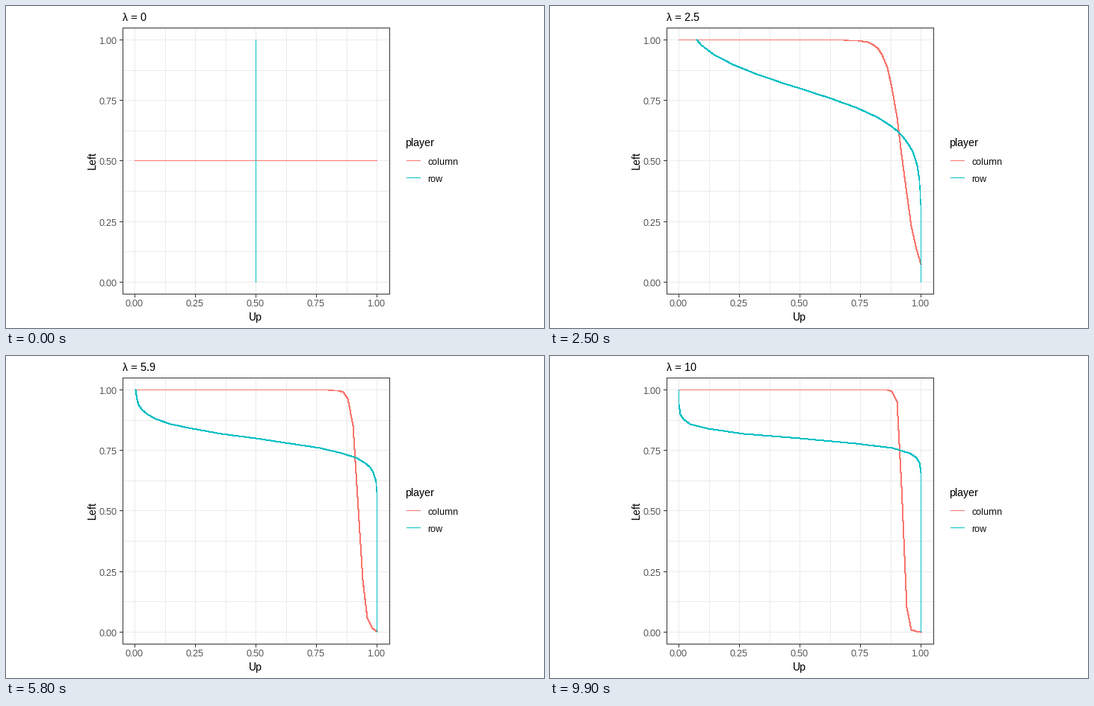
A matplotlib script that plays this animation: 720 by 432 pixels, repeating every 10 s.

```python
import numpy as np
import matplotlib.pyplot as plt
from matplotlib.animation import FuncAnimation

W, H, FRAMES = 720, 432, 100
LEFT, RIGHT, TOP, BOTTOM = 156, 513, 29, 386
X0, Y1, SPAN = 172.1, 45.38, 324.2
RED, TEAL = "#F8766D", "#00BFC4"

plt.rcParams.update({
    "font.family": "Liberation Sans",
    "text.hinting": "native",
    "text.hinting_factor": 1,
})

fig = plt.figure(figsize=(W / 72, H / 72), dpi=72, facecolor="white")
ax = fig.add_axes([0, 0, 1, 1])
ax.set_xlim(0, W)
ax.set_ylim(H, 0)
ax.axis("off")


def px(p):
    """Probability to the centre of its pixel column."""
    return np.floor(X0 + SPAN * np.asarray(p) + 0.5) + 0.5


def py(q):
    """Probability to the centre of its pixel row."""
    return np.floor(Y1 + SPAN * (1 - np.asarray(q)) + 0.5) + 0.5


def line(xs, ys, color, z=1, cap="butt"):
    return ax.plot(xs, ys, color=color, lw=1, zorder=z, antialiased=False,
                   solid_capstyle=cap, solid_joinstyle="round", snap=False)[0]


def text(x, y, s, size=15, color="black", **kw):
    return ax.text(x, y, s, fontsize=size, color=color, va="baseline", **kw)


def logistic(z):
    return 1 / (1 + np.exp(-z))


# Panel grid, ticks and labels
for k in range(9):
    v = k / 8
    x, y = px(v), py(v)
    line([x, x], [TOP, BOTTOM], "#EBEBEB")
    line([LEFT, RIGHT], [y, y], "#EBEBEB")
    if k % 2 == 0:
        line([x, x], [BOTTOM, BOTTOM + 5], "#333333")
        line([LEFT - 4, LEFT], [y, y], "#333333")
        text(x - 12.5, 403, f"{v:.2f}", 12, "#4D4D4D")
        text(125, y + 5.5, f"{v:.2f}", 12, "#4D4D4D")

for y in (TOP + 0.5, BOTTOM + 0.5):
    line([LEFT, RIGHT + 1], [y, y], "#333333", 6)
for x in (LEFT + 0.5, RIGHT + 0.5):
    line([x, x], [TOP, BOTTOM + 1], "#333333", 6)

text(325, 422, "Up")
text(120, 219, "Left", rotation=90, rotation_mode="anchor")

# Legend
text(534, 188, "player")
for y, name, color in ((207.5, "column", RED), (230.5, "row", TEAL)):
    line([536, 555], [y, y], color)
    text(564, y + 5.5, name, 12)

title = text(156, 20, "")
col = line([], [], RED, 3, "projecting")
row = line([], [], TEAL, 4, "projecting")

grid = np.linspace(0, 1, 51)


def update(i):
    lam = 10 * i / (FRAMES - 1)
    title.set_text(f"λ = {round(lam, 1):g}")
    # Logit responses of both players
    col.set_data(px(grid), py(logistic(lam * (12 - 13 * grid))))
    row.set_data(px(logistic(lam * (4 - 5 * grid))), py(grid))
    return title, col, row


anim = FuncAnimation(fig, update, frames=FRAMES, interval=100, repeat=True,
                     repeat_delay=0, blit=False)
plt.show()
```
